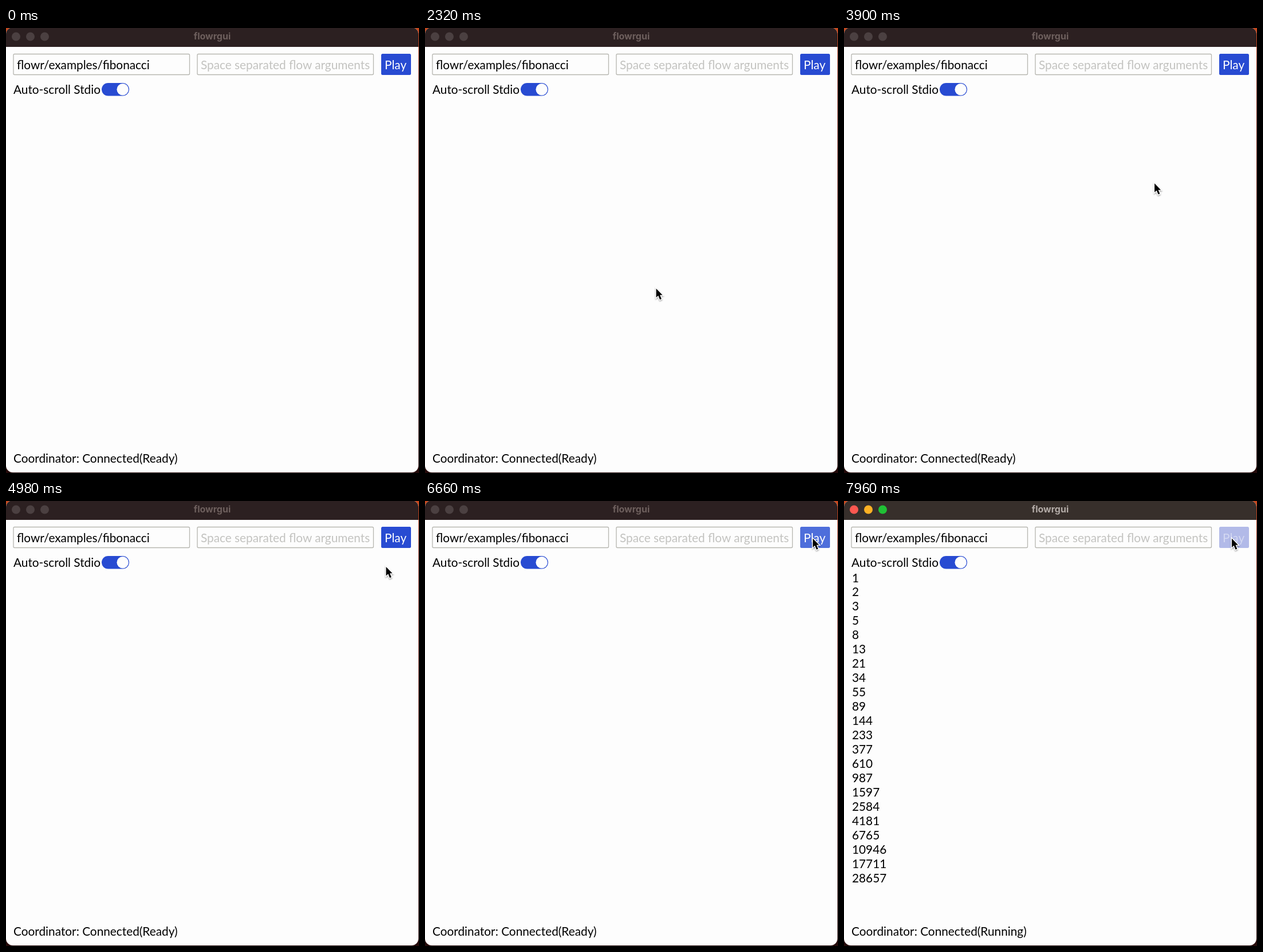
Animation, 721 px wide and 777 px high, one loop 8 s. Source, as an HTML page:

```html
<!DOCTYPE html>
<html lang="en">
<head>
<meta charset="utf-8">
<title>flowrgui</title>
<style>
  html, body { margin: 0; width: 100%; height: 100%; overflow: hidden; background: #2a0d0c; }
  svg { display: block; width: 721px; height: 777px; font: 20.8px Lato, sans-serif; }
  .title { font: bold 16px Inter, sans-serif; text-anchor: middle; fill: #6d5f5d; }
  .bar { fill: #2c2021; }
  .lights { fill: #4b4041; }
  .field { fill: #fdfdfd; stroke: #b6b6b0; stroke-width: 1.3; }
  .accent { fill: #284bd2; }
  .hint { fill: #c3c3c0; }
  .label { fill: #fff; }
  .hover .accent { fill: #4e6edb; }
  .disabled .accent { fill: #b2bae8; }
  .disabled .label { fill: #d3d8f2; }
  .active .bar { fill: #372f2b; }
  .active .title { fill: #b3aba7; }
  .active .close { fill: #fe5850; }
  .active .minimize { fill: #fdb124; }
  .active .zoom { fill: #20c035; }
</style>
</head>
<body>
<svg viewBox="0 0 721 777">
  <defs>
    <linearGradient id="desktop" x1="0" y1="0" x2="0" y2="1">
      <stop offset="0" stop-color="#c9491d"/>
      <stop offset=".12" stop-color="#7c2418"/>
      <stop offset="1" stop-color="#250b0b"/>
    </linearGradient>
    <clipPath id="frame"><rect y="-1" width="720" height="777" rx="12"/></clipPath>
    <filter id="shadow" x="-50%" y="-50%" width="200%" height="200%">
      <feDropShadow dx="0" dy="1.5" stdDeviation="1.3" flood-opacity=".4"/>
    </filter>
  </defs>
  <rect width="721" height="777" fill="url(#desktop)"/>
  <g id="window" clip-path="url(#frame)">
    <rect width="720" height="777" fill="#fdfdfd"/>
    <rect class="bar" width="720" height="33"/>
    <g class="lights">
      <circle class="close" cx="17.5" cy="15" r="7.5"/>
      <circle class="minimize" cx="42.5" cy="15" r="7.5"/>
      <circle class="zoom" cx="67.5" cy="15" r="7.5"/>
    </g>
    <text class="title" x="360" y="20">flowrgui</text>

    <rect class="field" x="13" y="45.5" width="307.5" height="36" rx="2"/>
    <text x="19" y="71.5">flowr/examples/fibonacci</text>
    <rect class="field" x="334" y="45.5" width="307.5" height="36" rx="2"/>
    <text class="hint" x="340" y="71.5">Space separated flow arguments</text>
    <g id="play">
      <rect class="accent" x="655" y="45" width="52" height="37" rx="2.5"/>
      <text class="label" x="661" y="71.5">Play</text>
    </g>

    <text x="13" y="115">Auto-scroll Stdio</text>
    <rect class="accent" x="167" y="96" width="48" height="22.5" rx="11.25"/>
    <circle cx="203.7" cy="107.3" r="10.2" fill="#fdfdfd"/>

    <g id="output"></g>
    <text id="status" x="13" y="758.5"></text>
  </g>
  <g id="pointer" filter="url(#shadow)">
    <path d="M0 0V15.5L3.6 12.3 6.5 19.2 9.3 18 6.5 11.3H11Z"
          stroke="#fff" stroke-width="2.6" paint-order="stroke"/>
  </g>
</svg>
<script>
  const LOOP = 8000, ACTIVATE = 6900, RUN = 7300, LINE_TIME = 30, MAX_LINES = 22;
  // Pointer waypoints: time, x, y
  const PATH = [
    [520, 368, 778], [1100, 381, 590], [1620, 387.5, 526], [2200, 399, 468], [3020, 430, 379.5],
    [3900, 542, 271.5], [4980, 663.5, 115], [5700, 677, 65.5], [LOOP, 677, 65.5]
  ];
  const byId = id => document.getElementById(id);
  const [windowBox, play, output, status, pointer] =
    ['window', 'play', 'output', 'status', 'pointer'].map(byId);

  const lines = [];
  for (let i = 0, a = 1, b = 2; i < MAX_LINES; i++, [a, b] = [b, a + b]) {
    const line = document.createElementNS('http://www.w3.org/2000/svg', 'text');
    line.setAttribute('x', 14);
    line.setAttribute('y', 141.5 + i * 24.96);
    line.textContent = a;
    lines.push(output.appendChild(line));
  }

  function pointerAt(t) {
    const next = PATH.findIndex(point => point[0] > t);
    if (next < 1) return null;
    const [t0, x0, y0] = PATH[next - 1], [t1, x1, y1] = PATH[next];
    const k = (t - t0) / (t1 - t0);
    return [x0 + (x1 - x0) * k, y0 + (y1 - y0) * k];
  }

  function render(t) {
    const position = pointerAt(t);
    const running = t >= RUN;
    pointer.style.display = position ? '' : 'none';
    if (position) pointer.setAttribute('transform', `translate(${position})`);

    const over = position && position[0] > 655 && position[1] < 82;
    play.setAttribute('class', running ? 'disabled' : over ? 'hover' : '');
    windowBox.setAttribute('class', t >= ACTIVATE ? 'active' : '');
    status.textContent = `Coordinator: Connected(${running ? 'Running' : 'Ready'})`;

    const shown = Math.floor((t - RUN) / LINE_TIME);
    lines.forEach((line, i) => line.style.display = i < shown ? '' : 'none');
  }

  const start = performance.now();
  function tick() {
    render((performance.now() - start) % LOOP);
    requestAnimationFrame(tick);
  }
  tick();
</script>
</body>
</html>
```
